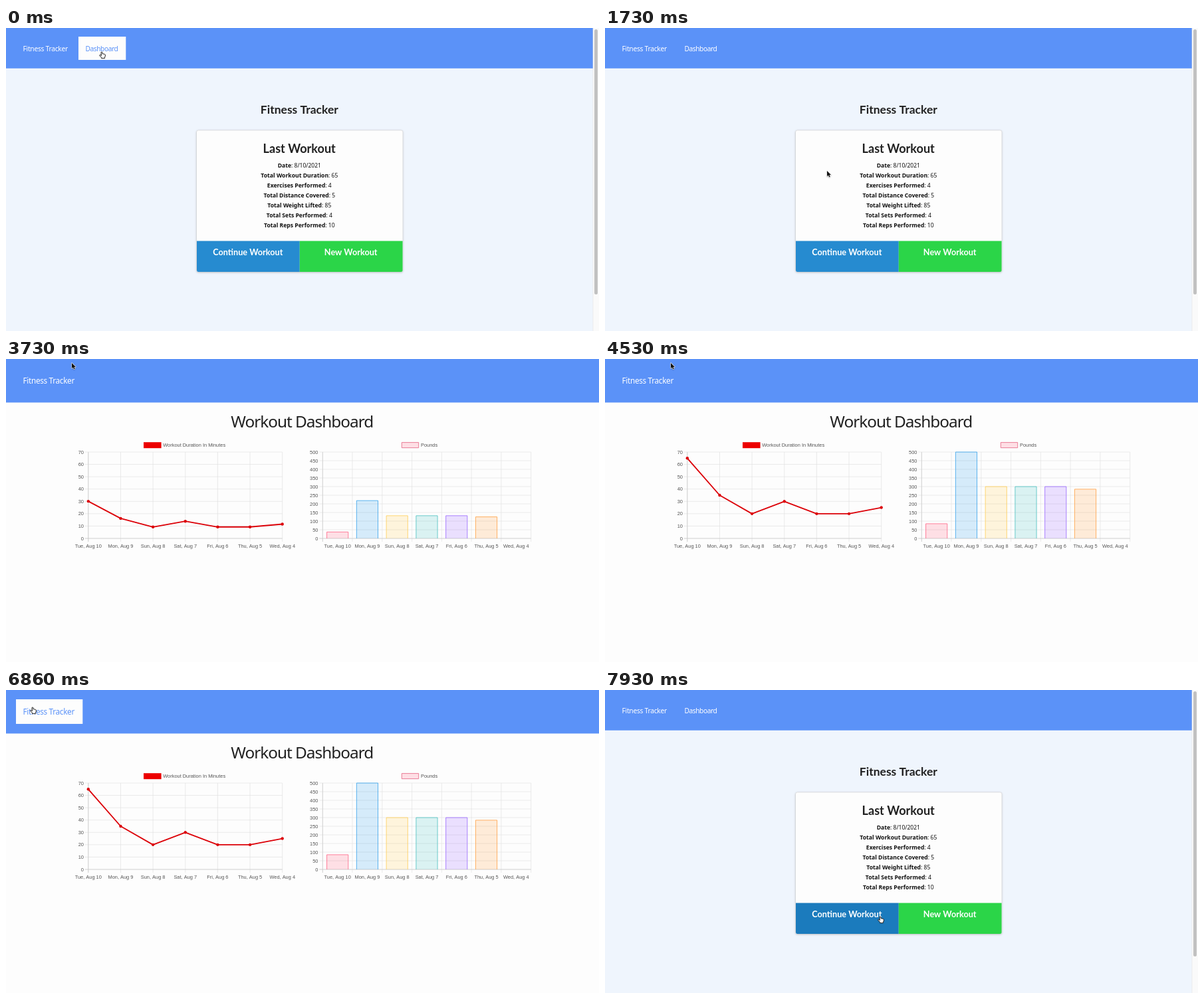
An HTML page with a canvas for the animation above (8000 ms loop, 892 by 456 pixels).

```html
<!DOCTYPE html>
<html lang="en">
<head>
<meta charset="utf-8">
<title>Fitness Tracker</title>
<style>
  html, body { margin: 0; width: 100%; height: 100%; overflow: hidden; }
  canvas { display: block; width: 892px; height: 456px; }
</style>
</head>
<body>
<canvas id="stage" width="892" height="456"></canvas>
<script>
const ctx = document.getElementById('stage').getContext('2d');
const LOOP = 8000, DASHBOARD_AT = 3560, HOME_AT = 7000;
const SANS = '"Noto Sans", sans-serif', LATO = 'Lato, sans-serif';
const CHART_FONT = '7.43px "Liberation Sans", Arial, sans-serif';
const BLUE = '#5b92f8', WHITE = '#fdfdfd', INK = '#212121';

// Pointer path: time, x, y
const PATH = [
  [0, 144, 36], [900, 146, 40], [1300, 250, 150], [1700, 334, 215], [1950, 334, 215],
  [2550, 99, 6], [4800, 99, 6], [5000, 90, 10], [5200, 52, 30], [5400, 48, 33],
  [5600, 44, 30], [6000, 40, 28], [6400, 40, 28], [6600, 48, 7], [6800, 40, 26],
  [7600, 40, 26], [7880, 414, 341], [LOOP, 414, 341]
];

const DAYS = ['Tue, Aug 10', 'Mon, Aug 9', 'Sun, Aug 8', 'Sat, Aug 7', 'Fri, Aug 6', 'Thu, Aug 5', 'Wed, Aug 4'];
const MINUTES = [65, 35, 20, 30, 20, 20, 25];
const POUNDS = [85, 500, 300, 300, 300, 285, 0];
const BAR_COLORS = ['255,99,132', '54,162,235', '255,206,86', '75,192,192', '153,102,255', '255,159,64'];
const SUMMARY = [
  ['Date', '8/10/2021'], ['Total Workout Duration', '65'], ['Exercises Performed', '4'],
  ['Total Distance Covered', '5'], ['Total Weight Lifted', '85'],
  ['Total Sets Performed', '4'], ['Total Reps Performed', '10']
];
const TOP = 140, BASE = 270;

const easeOutQuart = p => 1 - (1 - Math.min(1, Math.max(0, p))) ** 4;

function rect(x, y, w, h, color, radius = 0) {
  ctx.fillStyle = color;
  ctx.beginPath();
  ctx.roundRect(x, y, w, h, radius);
  ctx.fill();
}

function line(x1, y1, x2, y2) {
  ctx.beginPath();
  ctx.moveTo(x1, y1);
  ctx.lineTo(x2, y2);
  ctx.stroke();
}

function text(str, x, y, font, color, align = 'left', spacing = 0) {
  ctx.font = font;
  ctx.letterSpacing = spacing + 'px';
  ctx.textAlign = align;
  ctx.fillStyle = color;
  ctx.fillText(str, x, y);
}

function pointerAt(t) {
  const i = PATH.findIndex(key => key[0] > t);
  const [t0, x0, y0] = PATH[i - 1], [t1, x1, y1] = PATH[i];
  const p = (t - t0) / (t1 - t0), k = p * p * (3 - 2 * p);
  return { x: x0 + (x1 - x0) * k, y: y0 + (y1 - y0) * k };
}

const inside = (p, x, y, w, h) => p.x >= x && p.x < x + w && p.y >= y && p.y < y + h;

// Draws a menu link and tells whether it is hovered
function link(label, box, x, y, size, spacing, pointer, live) {
  const hover = live && inside(pointer, ...box);
  if (hover) rect(...box, WHITE);
  text(label, x, y, `${size}px ${SANS}`, hover ? BLUE : '#fff', 'left', spacing);
  return hover;
}

function drawHome(pointer, live) {
  rect(0, 0, 892, 456, '#eff5fd');
  rect(0, 0, 883, 60.7, BLUE);
  rect(883, 0, 9, 456, '#fafafa');
  rect(882.7, 0, 0.6, 456, '#e4e4e4');
  rect(885, 2, 5, 399, '#c1c1c1', 2.5);

  const overTracker = link('Fitness Tracker', [15, 13, 90, 35], 25.5, 34.8, 10.2, -0.25, pointer, live);
  const overDashboard = link('Dashboard', [109, 13, 71.3, 35], 119.5, 34.8, 10.2, -0.43, pointer, live);

  text('Fitness Tracker', 441.3, 128.5, `bold 17.5px ${LATO}`, INK, 'center');

  ctx.save();
  ctx.shadowColor = '#bbbbbe';
  ctx.shadowBlur = 3;
  ctx.shadowOffsetY = 0.8;
  rect(286.6, 153.7, 310.4, 213.4, '#d4d4d5', 3);
  ctx.restore();
  rect(287, 154.2, 309.6, 212.8, WHITE, 2.5);

  const overContinue = inside(pointer, 287, 320.5, 154.8, 46.5);
  rect(287, 320.5, 154.8, 46.5, overContinue ? '#1b7bbd' : '#268bd0', [0, 0, 0, 2.5]);
  rect(441.8, 320.5, 154.8, 46.5, '#2bd548', [0, 0, 2.5, 0]);
  text('Continue Workout', 363.8, 341.8, `bold 12.7px ${LATO}`, '#fff', 'center');
  text('New Workout', 518.7, 341.8, `bold 12.7px ${LATO}`, '#fff', 'center');
  text('Last Workout', 441.2, 187.5, `bold 18.1px ${LATO}`, INK, 'center');

  const regular = `8.5px ${SANS}`, bold = `bold 8.65px ${SANS}`;
  ctx.letterSpacing = '0px';
  SUMMARY.forEach(([label, value], i) => {
    const y = 210.1 + i * 14.9, rest = ': ' + value;
    ctx.font = bold;
    const labelWidth = ctx.measureText(label).width;
    ctx.font = regular;
    const x = 441.3 - (labelWidth + ctx.measureText(rest).width) / 2;
    text(label, x, y, bold, '#111');
    text(rest, x + labelWidth, y, regular, '#111');
  });
  return overTracker || overDashboard || overContinue;
}

function drawAxes(left, right, max, step, cell, labelShift) {
  ctx.lineWidth = 0.62;
  ctx.strokeStyle = '#dedede';
  for (let v = 0; v <= max; v += step) {
    const y = BASE - v / max * (BASE - TOP);
    line(left - 5, y, right, y);
    text(v, left - 6.8, y + 2.6, CHART_FONT, '#555', 'right');
  }
  for (let x = left; x < right + 1; x += cell) line(x, TOP, x, BASE + 5);
  ctx.strokeStyle = '#c4c4c4';
  line(left, TOP, left, BASE + 5);
  line(left - 5, BASE, right, BASE);
  DAYS.forEach((day, i) => text(day, left + labelShift + i * cell, 283.7, CHART_FONT, '#555', 'center'));
}

function drawLineChart(grow) {
  const left = 123.8, cell = 48.65;
  rect(207, 125.2, 26.6, 9, '#ec0000');
  text('Workout Duration In Minutes', 236.2, 132.3, CHART_FONT, '#555');
  drawAxes(left, left + cell * 6, 70, 10, cell, 0);

  const points = MINUTES.map((m, i) => [left + i * cell, BASE - m / 70 * (BASE - TOP) * grow]);
  ctx.strokeStyle = ctx.fillStyle = '#dc0008';
  ctx.lineWidth = 1.86;
  ctx.lineJoin = 'round';
  ctx.beginPath();
  points.forEach(p => ctx.lineTo(...p));
  ctx.stroke();
  for (const [x, y] of points) {
    ctx.beginPath();
    ctx.arc(x, y, 2.2, 0, Math.PI * 2);
    ctx.fill();
  }
}

function drawBarChart(grow) {
  const left = 476.3, cell = 44.77, width = 32.2;
  rect(595.3, 125.6, 25.4, 8, 'rgba(255,99,132,.2)');
  ctx.lineWidth = 0.9;
  ctx.strokeStyle = '#e8718d';
  ctx.strokeRect(595.3, 125.6, 25.4, 8);
  text('Pounds', 624, 132.3, CHART_FONT, '#555');
  drawAxes(left, left + cell * 7, 500, 50, cell, cell / 2);

  BAR_COLORS.forEach((rgb, i) => {
    const x = left + cell * (i + 0.5) - width / 2;
    const y = BASE - POUNDS[i] / 500 * (BASE - TOP) * grow;
    rect(x, y, width, BASE - y, `rgba(${rgb},.2)`);
    ctx.strokeStyle = `rgb(${rgb})`;
    ctx.lineWidth = 0.8;
    ctx.beginPath();
    ctx.moveTo(x, BASE);
    ctx.lineTo(x, y);
    ctx.lineTo(x + width, y);
    ctx.lineTo(x + width, BASE);
    ctx.stroke();
  });
}

function drawDashboard(t, pointer) {
  rect(0, 0, 892, 456, WHITE);
  rect(0, 0, 892, 65.4, BLUE);
  const hover = link('Fitness Tracker', [15, 14, 100.3, 37], 25.5, 37.4, 11.7, -0.28, pointer, true);
  text('Workout Dashboard', 445.2, 102.6, `24.4px ${SANS}`, INK, 'center', -1.02);
  drawLineChart(easeOutQuart((t - 3587) / 1000));
  drawBarChart(easeOutQuart((t - 3597) / 1000));
  return hover;
}

const ARROW = new Path2D('M0 0V8.2L1.9 6.5L3.2 9.4L4.7 8.8L3.4 5.9H6Z');
const HAND = new Path2D('M-.9 .6Q0-.6 .8 .6L1.1 3Q2 2.4 2.6 3.3Q3.5 2.8 4 3.7Q5 3.3 5.2 4.4' +
  'Q5.5 6.8 4.3 8.1V9.4H-.3V8.4L-3.1 5.2Q-3 4.1-1.9 4.5L-.4 5.6Z');

function drawPointer({ x, y }, hand) {
  ctx.save();
  ctx.translate(x, y);
  ctx.shadowColor = 'rgba(0,0,0,.35)';
  ctx.shadowBlur = 1.5;
  ctx.shadowOffsetY = 0.7;
  ctx.lineJoin = 'round';
  ctx.lineWidth = hand ? 0.8 : 1.1;
  ctx.strokeStyle = hand ? '#222' : '#fff';
  ctx.fillStyle = hand ? '#fff' : '#111';
  const shape = hand ? HAND : ARROW;
  ctx.stroke(shape);
  ctx.shadowColor = 'transparent';
  ctx.fill(shape);
  if (hand) ctx.stroke(shape);
  ctx.restore();
}

function frame(now) {
  let t = now % LOOP;
  if (t >= 4800 && t < 7600) t = Math.floor(t / 200) * 200;
  const pointer = pointerAt(t);
  const onDashboard = t >= DASHBOARD_AT && t < HOME_AT;
  const settled = t < HOME_AT || t >= HOME_AT + 400;
  const hand = onDashboard ? drawDashboard(t, pointer) : drawHome(pointer, settled);
  drawPointer(pointer, hand);
  requestAnimationFrame(frame);
}
requestAnimationFrame(frame);
</script>
</body>
</html>
```
